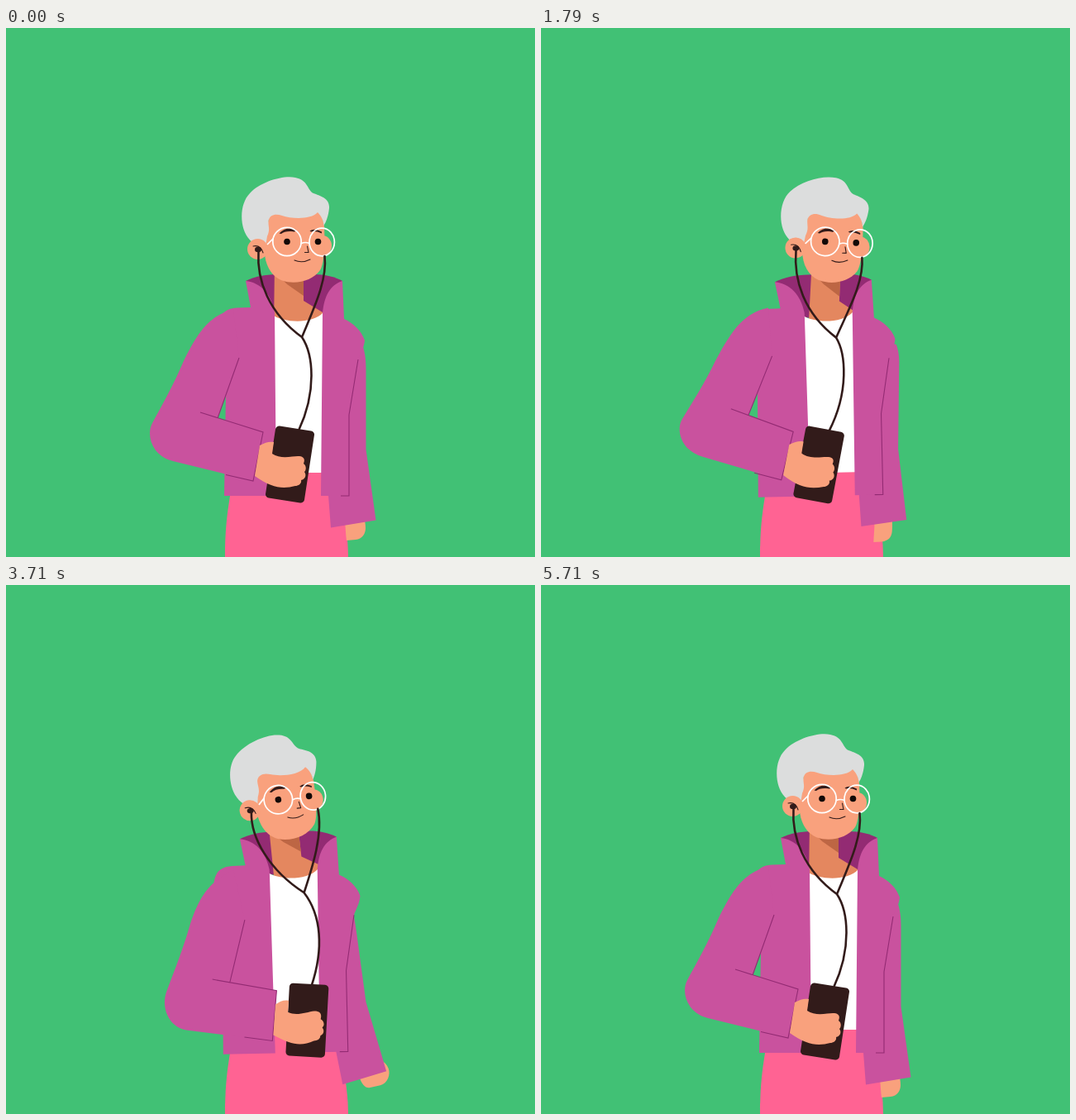
Animation, 640 px wide and 640 px high, one loop 6780 ms. Source, as an HTML page:

```html
<!DOCTYPE html>
<html lang="en">
<head>
<meta charset="utf-8">
<title>Listening to music</title>
<style>
  html, body { margin: 0; width: 100%; height: 100%; overflow: hidden; background: #41c175; }
  svg { display: block; width: 100vw; height: 100vh; }
  .jacket { fill: #c9529e; }
  .lining { fill: #932b73; }
  .seam { fill: none; stroke: #932b73; stroke-width: 1.1; }
  .skin { fill: #f9a17d; }
  .dark { fill: #321b1a; }
  .ink { fill: none; stroke: #321b1a; stroke-width: 1.1; stroke-linecap: round; stroke-linejoin: round; }
  .cord { fill: none; stroke: #321b1a; stroke-width: 2.6; stroke-linecap: round; stroke-linejoin: round; }
  .glass { fill: none; stroke: #fff; stroke-width: 1.7; stroke-linecap: round; }
</style>
</head>
<body>
<svg viewBox="0 0 640 640">
  <rect width="640" height="640" fill="#41c175"/>
  <path fill="#ff6393" d="M272 560C268 585 265 605 265 640H414C414 610 408 585 402 536H300Z"/>

  <g class="torso">
    <path class="lining" d="M290 306C302 300 316 298 330 298H372C386 298 398 301 407 306L384 350H325Z"/>
  </g>
  <g class="head">
    <path fill="#e4875f" d="M325 285L324 362H388L383 344L360 330V285Z"/>
    <path fill="#bd6644" d="M330 300L340 310L360 324V296Z"/>
  </g>
  <g class="torso">
    <path fill="#fff" d="M324 348C336 356 370 359 384 344L382 538H326Z"/>
    <path class="skin" id="backHand"/>
    <path class="jacket" id="backSleeve"/>
    <path class="jacket" d="M290 306C308 308 321 322 325 344L327 566H264L266 440L257 362C258 350 262 339 280 338.5L296 338Z"/>
    <path class="jacket" d="M407 306C392 311 385 324 383 345L381 566H415V468L426 401C428 395 433 388 434 378C430 366 420 357 409 352Z"/>
    <path class="seam" d="M426 401L415 468V566H405"/>
  </g>

  <g class="head">
    <ellipse class="skin" cx="383" cy="263.5" rx="11" ry="12.5"/>
    <path class="skin" d="M320 215L313 262C311 284 320 300 334 305.500C350 311 371 306 380 293C385 285 386 262 385 240L380 215Z"/>
    <path fill="#dcdddd" d="M298 259C282 247 281 214 295 200C308 186 335 178 350 181C366 184 364 196 372 200C380 203 392 206 391 218C390 228 387 235 384.500 239C384 231 380 226 377 223C369 232 346 231 334 227C326 224 319 226 317.500 233C317 240 320 243 316 252L314 264Z"/>
    <circle class="skin" cx="304.500" cy="267.500" r="12.500"/>
    <path class="ink" d="M299 264Q308 262 311 272"/>
    <ellipse class="dark" cx="305" cy="268" rx="4" ry="3.200"/>
    <path class="dark" d="M330.500 248.500C336 242 344 241 351 244Q351 247 347 246.300C341 245.500 336 246.500 333 249Z"/>
    <path class="dark" d="M367.500 245.500Q373 241.500 382 246.500L382 248.500Q374 245 369 246.500Z"/>
    <circle cx="340" cy="258.500" r="3.800" fill="#120807"/>
    <circle cx="377.500" cy="258.500" r="3.800" fill="#120807"/>
    <path class="ink" d="M364.500 264L366 271.500H361.500M349 281Q358 285 368 280"/>
    <circle class="glass" cx="340" cy="258.500" r="17.200"/>
    <ellipse class="glass" cx="382.200" cy="259" rx="15.200" ry="16.800"/>
    <path class="glass" d="M357.500 260.500Q362 258.500 367 260.500M323 255L316.500 261.500"/>
  </g>

  <path class="jacket" id="arm"/>
  <path class="seam" id="armSeam"/>
  <path class="cord" id="cord"/>
  <rect class="dark" id="phone" x="-23.750" y="-44" width="47.500" height="88" rx="4.500"/>
  <path class="skin" id="hand"/>
</svg>
<script>
const LOOP = 6780;

// Dance phase in degrees by tick (14 ticks a second), linear in between.
const PHASE = [
  [0, 240], [3, 240], [4, 252], [5, 278], [13, 577], [15, 600], [16, 600],
  [17, 612], [18, 638], [33, 1158], [34, 1193], [36, 1198], [37, 1320], [46, 1320],
  [47, 1332], [48, 1358], [52, 1481], [62, 1817], [69, 2044], [80, 2400], [95, 2400]
];

// Each path: resting pose, then the pose at full sway.
const POSES = {
  backHand: [
    'M410 598C411 606 411 614 412 620L423 619C431 618 435 612 435 605C435 600 434 596 433 590Z',
    'M430 595C434 606 438 610 444 609L458 606C467 604 471 592 468 585C466 580 462 577 458 575Z'],
  backSleeve: [
    'M405 380L432 386C435 395 435.5 405 435.5 412L435.5 510L447.5 595.5L393 604.5L388 540Z',
    'M405 380L422 390C424 400 426 412 427 420L438.5 506L463 590L410 606L399 550Z'],
  arm: [
    'M275 340C245 349 232 368 214 405C203 431 190 454 177 478C169 493 177 518 202 524L299 548L311 489L256 472L282 399Z',
    'M275 345C246 362 235 376 224 412C217 439 207 466 197 494C190 514 200 539 223 541L326 552L330 491L273 483L290 406Z'],
  armSeam: [
    'M282 399L256 472M235 465L311 489L299 548L266 540.5',
    'M290 406L273 483M252 479L330 491L326 552L292 548'],
  cord: [
    'M305.5 270C303 305 318 345 358 374C372 340 389 305 385.5 276M358 374C372 395 376 440 354 487',
    'M295.5 276C295 305 318 345 361 372C371 340 383 300 376 270M361 372C383 400 386 440 372 485'],
  hand: [
    'M301 542L307 505C314 501 319 500 324 501L322 515C332 522 346 518 353 518C361 518 362 522 360 527C364 530 363 535 361 537C364 541 362 546 357 547C358 551 354 554 350 554C335 558 322 557 301 542Z',
    'M327 545L329 508C334 504 339 502 345 503L344 517C355 522 367 516 376 515C385 515 385 520 384 525C389 528 389 533 386 535C389 539 388 543 384 545C384 549 380 551 376 551C361 558 350 557 327 545Z']
};

const mix = (a, b, u) => a + (b - a) * u;
const smooth = (lo, hi, x) => {
  const u = Math.min(1, Math.max(0, (x - lo) / (hi - lo)));
  return u * u * (3 - 2 * u);
};

function mixPath([from, to], u) {
  const ends = to.match(/[\d.]+/g);
  let i = 0;
  return from.replace(/[\d.]+/g, n => mix(+n, +ends[i++], u).toFixed(2));
}

function phaseAt(tick) {
  const i = Math.max(1, PHASE.findIndex(([k]) => k >= tick));
  const [k0, a] = PHASE[i - 1], [k1, b] = PHASE[i];
  return mix(a, b, (tick - k0) / (k1 - k0));
}

const byId = id => document.getElementById(id);
const rotateAll = (selector, value) =>
  document.querySelectorAll(selector).forEach(el => el.setAttribute('transform', value));

let shown = -1;
function draw(ms) {
  const tick = Math.floor((Math.floor(ms / 10) + 0.5) * 0.14);
  if (tick === shown) return;
  shown = tick;

  const phase = phaseAt(tick) % 360;
  const sway = (Math.cos(phase * Math.PI / 180) + 0.5) / 1.454;
  const lean = smooth(5, 41, phase) - smooth(165, 205, phase);

  for (const id in POSES) byId(id).setAttribute('d', mixPath(POSES[id], sway));
  rotateAll('.head', `rotate(${-7.6 * sway} 345 352)`);
  rotateAll('.torso', `rotate(${-1.3 * lean} 345 620)`);
  byId('phone').setAttribute('transform',
    `translate(${mix(343.5, 367.7, sway)} ${mix(528, 526.5, sway)}) rotate(${mix(8.7, 2.3, sway)})`);
}

const start = performance.now();
function loop() {
  draw((performance.now() - start) % LOOP);
  requestAnimationFrame(loop);
}
draw(0);
requestAnimationFrame(loop);
</script>
</body>
</html>
```
